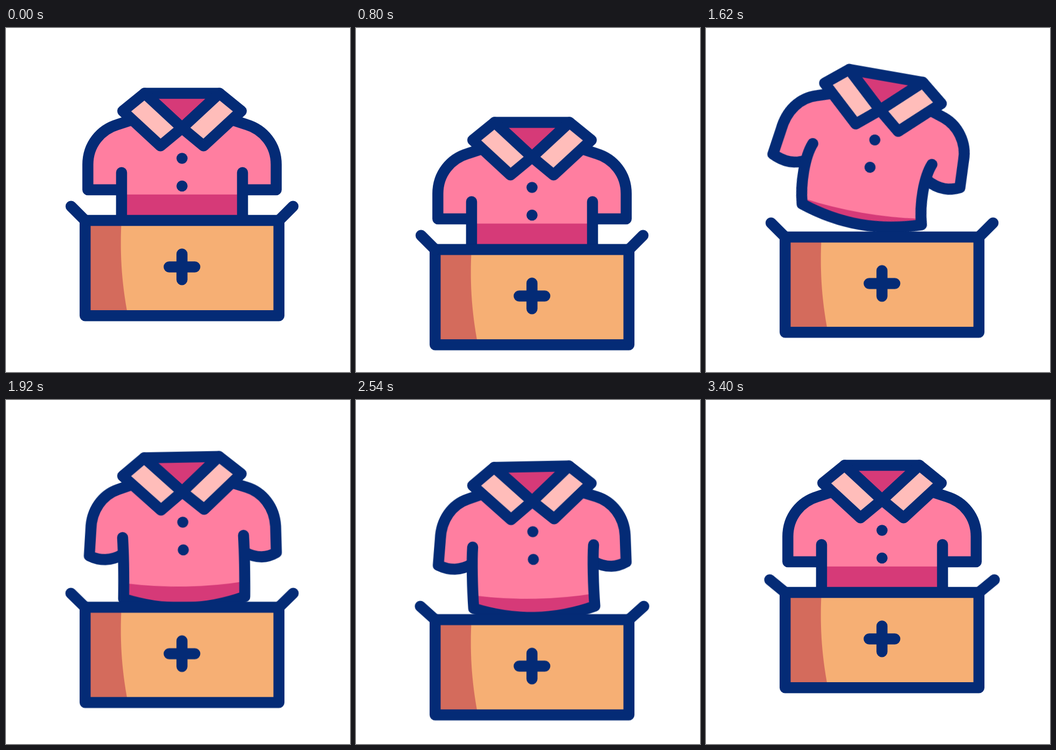
Recreate the animation shown at these times as an HTML page. Size 640 by 640 pixels, loop 3.62 s.

```html
<!DOCTYPE html>
<html lang="en">
<head>
<meta charset="utf-8">
<title>Shirt in a box</title>
<style>
  html, body { margin: 0; width: 100%; height: 100%; overflow: hidden; background: #fff; }
  svg { display: block; width: 100vw; height: 100vh; }

  .line { stroke: #042b76; stroke-width: 20.5; stroke-linecap: round; stroke-linejoin: round; }
  .none { fill: none; }
  .pink { fill: #ff7ea0; }
  .deep { fill: #d63a78; }
  .pale { fill: #ffbdba; }
  .navy { fill: #042b76; }
  .card { fill: #f6af74; }
  .shade { fill: #d46b5c; }

  .bob, .jump, .flap, .soft {
    animation: 3.62s cubic-bezier(.3333, 0, .6667, 1) infinite;
  }
  .bob { animation-name: bob; }
  .jump { animation-name: jump; transform-origin: 327.5px 164.5px; }
  .flap { animation-name: flap; transform-origin: 147.2px 358px; }
  .soft { animation-name: soft; d: var(--rest); }

  /* Soft parts: at rest, leaning right (a), leaning left (b) */
  .sleeves {
    --rest: path("M216 301 Q184 301 152.3 301 L152.3 254 C152.3 217 176 189 208 179.5 L240 169 L415 169 L447 179.5 C479 189 502.7 217 502.7 254 L502.7 301 Q471 301 439 301");
    --a: path("M209 301 Q180 318 145.3 301 L152.3 254 C156 217 176 189 208 179.5 L240 169 L415 169 L447 179.5 C474 189 497 217 496.7 252 L498.7 302.5 Q468 318 435 299");
    --b: path("M220 299 Q187 318 158.3 302.5 L159.5 252 C159 217 181 189 208 179.5 L240 169 L415 169 L447 179.5 C479 189 500 217 502.7 254 L502 301.5 Q475 318 446 301");
  }
  .torso {
    --rest: path("M215 269 C215 295 215 345 214.8 383 Q327.5 383 440.2 383 C440 345 440 295 440 269");
    --a: path("M215 269 C204.5 295 204.5 345 214.8 383 Q327.5 421 440.2 383 C429.5 345 429.5 295 440 269");
    --b: path("M215 269 C225.5 295 225.5 345 214.8 383 Q327.5 421 440.2 383 C450.5 345 450.5 295 440 269");
  }
  .band {
    --rest: path("M215 309.7 Q327.5 309.7 440 309.7 L440.2 383 Q327.5 383 214.8 383 Z");
    --a: path("M213 372 Q327.5 388 438 372 L440.2 383 Q327.5 421 214.8 383 Z");
    --b: path("M223 340 Q335 356 448 340 L440.2 383 Q327.5 421 214.8 383 Z");
  }

  @keyframes bob {
    0%, 5.525% { transform: translateY(0); }
    27.624% { transform: translateY(64px); }
    49.724% { transform: translateY(26px); }
    71.823% { transform: translateY(51px); }
    93.923%, 100% { transform: translateY(0); }
  }
  @keyframes flap {
    0%, 5.525%, 49.724%, 93.923%, 100% { transform: rotate(0deg); }
    27.624%, 71.823% { transform: rotate(-15deg); }
  }
  @keyframes jump {
    0%, 27.624% { transform: translateY(0) rotate(0deg); }
    44.199% { transform: translateY(-64px) rotate(10deg); }
    60.773% { transform: translateY(-25.4px) rotate(-10deg); }
    77.348% { transform: translateY(-63px) rotate(4.8deg); }
    93.923%, 100% { transform: translateY(0) rotate(0deg); }
  }
  @keyframes soft {
    0%, 27.624%, 93.923%, 100% { d: var(--rest); }
    44.199%, 77.348% { d: var(--a); }
    60.773% { d: var(--b); }
  }
</style>
</head>
<body>
<svg viewBox="0 0 640 640">
  <defs>
    <path id="collar" class="line pale" d="M258 121.4 L217.3 154.5 L287.3 219.3 L327.5 186 Z"/>
    <path id="flap" class="line none flap" d="M147.2 358 L121 331.8"/>
  </defs>
  <g class="bob">
    <g class="jump">
      <path class="soft sleeves line pink"/>
      <path class="soft torso pink"/>
      <path class="soft band deep"/>
      <path class="soft torso line none"/>
      <path class="line deep" d="M258 121.4 H397 L327.5 186 Z"/>
      <use href="#collar"/>
      <use href="#collar" transform="translate(655) scale(-1 1)"/>
      <circle class="navy" cx="327.5" cy="242.5" r="10.3"/>
      <circle class="navy" cx="327.5" cy="294" r="10.3"/>
    </g>
    <path class="card" d="M147.2 358 H507.8 V535.3 H147.2 Z"/>
    <path class="shade" d="M147.2 358 H214.8 C212 412 214 470 227 535.3 H147.2 Z"/>
    <path class="line none" d="M147.2 358 H507.8 V535.3 H147.2 Z"/>
    <use href="#flap"/>
    <use href="#flap" transform="translate(655) scale(-1 1)"/>
    <path class="line none" d="M303.5 444.4 H351.3 M327.4 420.6 V468.3"/>
  </g>
</svg>
</body>
</html>
```
